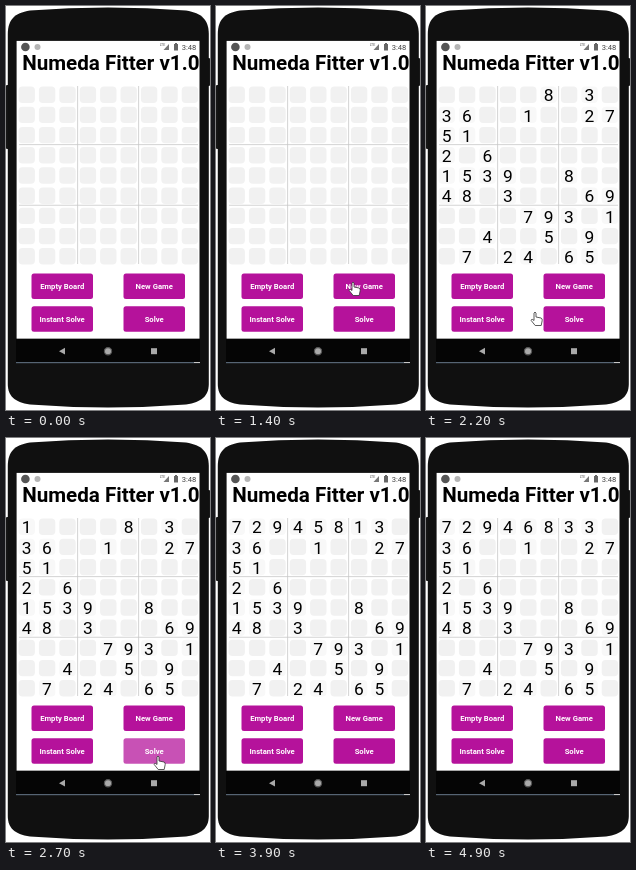
An HTML page that plays this animation: 204x404 px, repeating every 5 s.

```html
<!DOCTYPE html>
<html lang="en">
<head>
<meta charset="utf-8">
<title>Number puzzle</title>
<style>
  html, body { margin: 0; width: 100%; height: 100%; overflow: hidden; background: #fff; }
  svg { display: block; width: 204px; height: 404px; font-family: Roboto, Arial, sans-serif; }
  text { text-anchor: middle; }
  .title { font-size: 20.6px; font-weight: 700; }
  .digit { font-size: 17.4px; fill: #000; }
  .label { font-size: 7.7px; font-weight: 700; fill: #fff; }
  .clock { font-size: 7.6px; fill: #444; }
  .network { font-size: 3.6px; fill: #555; }
</style>
</head>
<body>
<svg id="stage" viewBox="0 0 204 404">
  <rect x="0" y="79" width="6" height="64" rx="1" fill="#161616"/>
  <rect x="199" y="52" width="5" height="28" rx="1" fill="#161616"/>
  <path fill="#101010" d="M1.800 28C2 14 8 7 24 4.500Q102-1.500 180 4.500C196 7 202.600 14 202.800 28
    V378C202.600 390 196 396 180 398.500Q102 404.500 24 398.500C8 396 2 390 1.800 378z"/>
  <rect x="10.600" y="34.900" width="182.900" height="297.900" fill="#fff"/>
  <circle cx="19.400" cy="41" r="4.300" fill="#555"/>
  <circle cx="31.500" cy="41" r="3" fill="#b5b5b5"/>
  <text class="network" x="156.500" y="40">LTE</text>
  <path d="M163 38v6h-5.500z" fill="#777"/>
  <path d="M168 38h1v-1h2v1h1v6.500h-4z" fill="#666"/>
  <text class="clock" x="183" y="43.500">3:48</text>
  <text class="title" x="104.800" y="63.700">Numeda Fitter v1.0</text>
  <g id="board"></g>
  <g id="buttons"></g>
  <rect x="10" y="332.800" width="184" height="23.200" fill="#050505"/>
  <path d="M59 341.800v6.800l-6-3.400z" fill="#aaa"/>
  <circle cx="102" cy="345.200" r="3.600" fill="#aaa" stroke="#555" stroke-width="1.200"/>
  <rect x="145" y="342.200" width="6" height="6" fill="#aaa"/>
  <rect x="10" y="356" width="184" height="1.200" fill="#566473"/>
  <rect x="188" y="356" width="6" height="1" fill="#c8c8c8"/>
  <path id="hand" fill="#fff" stroke="#333" stroke-width=".8" stroke-linejoin="round"
    d="M-1 1q1-2 2 0v4l5 1q1.500 .5 1.200 2.500l-1 5h-6l-4-5q0-1.500 1.500-1l1.300 1z"/>
</svg>
<script>
const LOOP = 5000, TICK = 100;
const givens = [
  '000008030', '360010027', '510000000',
  '206000000', '153900800', '480300069',
  '000079301', '004005090', '070240650'
].join('').split('').map(Number);

// [tick, x, y] of the fingertip
const handPath = [[5, 165, 345], [7, 166, 204], [8, 166, 204], [12, 138, 277], [13, 138, 277],
  [14, 137, 276], [16, 137, 276], [22, 109, 306], [26, 152, 318], [27, 152, 318], [29, 176, 304], [30, 176, 304]];
// [tick, solver step]
const pace = [[27, 1], [28, 2], [29, 6], [30, 6], [31, 13], [39, 58], [48, 109], [49, 111]];
const newGameFade = { 16: .4, 17: .6, 18: .85 };
const solveFade = { 25: .6, 26: .5, 27: .73 };

function add(parent, tag, attrs, text = '') {
  const el = document.createElementNS('http://www.w3.org/2000/svg', tag);
  for (const key in attrs) el.setAttribute(key, attrs[key]);
  el.textContent = text;
  return parent.appendChild(el);
}

function at(keys, t) {
  let i = 0;
  while (i < keys.length - 2 && t >= keys[i + 1][0]) i++;
  const a = keys[i], b = keys[i + 1];
  const k = Math.min(1, Math.max(0, (t - a[0]) / (b[0] - a[0])));
  return a.slice(1).map((v, n) => v + (b[n + 1] - v) * k);
}

function fits(grid, cell, n) {
  const row = Math.floor(cell / 9), col = cell % 9;
  return grid.every((v, i) => {
    if (v !== n || i === cell) return true;
    const r = Math.floor(i / 9), c = i % 9;
    const sameBox = Math.floor(r / 3) === Math.floor(row / 3) && Math.floor(c / 3) === Math.floor(col / 3);
    return r !== row && c !== col && !sameBox;
  });
}

// Backtracking that yields every attempt and every cleared cell
function* solve(grid) {
  const cell = grid.indexOf(0);
  if (cell < 0) return true;
  for (let n = 1; n <= 9; n++) {
    grid[cell] = n;
    yield grid.slice();
    if (fits(grid, cell, n) && (yield* solve(grid))) return true;
  }
  grid[cell] = 0;
  yield grid.slice();
  return false;
}

const steps = [givens];
const solver = solve(givens.slice());
while (steps.length < 112) steps.push(solver.next().value);

const board = document.getElementById('board');
const centers = givens.map((_, i) => [20.7 + 20.4 * (i % 9), 88.7 + 20.2 * Math.floor(i / 9)]);
const cells = centers.map(([x, y]) =>
  add(board, 'rect', { x: x - 8.2, y: y - 8.2, width: 16.4, height: 16.4, rx: 4 }));
for (const x of [71.7, 132.7]) add(board, 'rect', { x: x - .4, y: 80, width: .8, height: 178, fill: '#c8c8c8' });
for (const y of [138.7, 199.2]) add(board, 'rect', { x: 13, y: y - .4, width: 179, height: .8, fill: '#c8c8c8' });
const digits = centers.map(([x, y]) => add(board, 'text', { class: 'digit', x: x - .1, y: y + 6.6 }));

function button(x, y, label) {
  const g = add(document.getElementById('buttons'), 'g', {});
  add(g, 'rect', { x, y, width: 61.5, height: 25.5, rx: 2.5, fill: '#b5129b' });
  add(g, 'text', { class: 'label', x: x + 30.7, y: y + 15.5 }, label);
  return g;
}
button(25.5, 267.5, 'Empty Board');
const newGame = button(117.5, 267.5, 'New Game');
button(25.5, 300.3, 'Instant Solve');
const solveButton = button(117.5, 300.3, 'Solve');
const hand = document.getElementById('hand');

function draw(tick) {
  const step = tick < 27 ? 0 : Math.round(at(pace, tick)[0]);
  const grid = tick < 17 ? [] : steps[step];
  digits.forEach((el, i) => {
    el.textContent = grid[i] || '';
    cells[i].setAttribute('fill', grid[i] ? '#f8f8f8' : '#f1f1f1');
  });
  newGame.setAttribute('opacity', newGameFade[tick] || 1);
  solveButton.setAttribute('opacity', solveFade[tick] || 1);
  hand.setAttribute('visibility', tick >= 5 && tick <= 30 ? 'visible' : 'hidden');
  hand.setAttribute('transform', `translate(${at(handPath, tick)})`);
}

const start = performance.now();
let shown = -1;
function loop() {
  const tick = Math.floor(((performance.now() - start) % LOOP) / TICK);
  if (tick !== shown) draw(shown = tick);
  requestAnimationFrame(loop);
}
loop();
</script>
</body>
</html>
```
